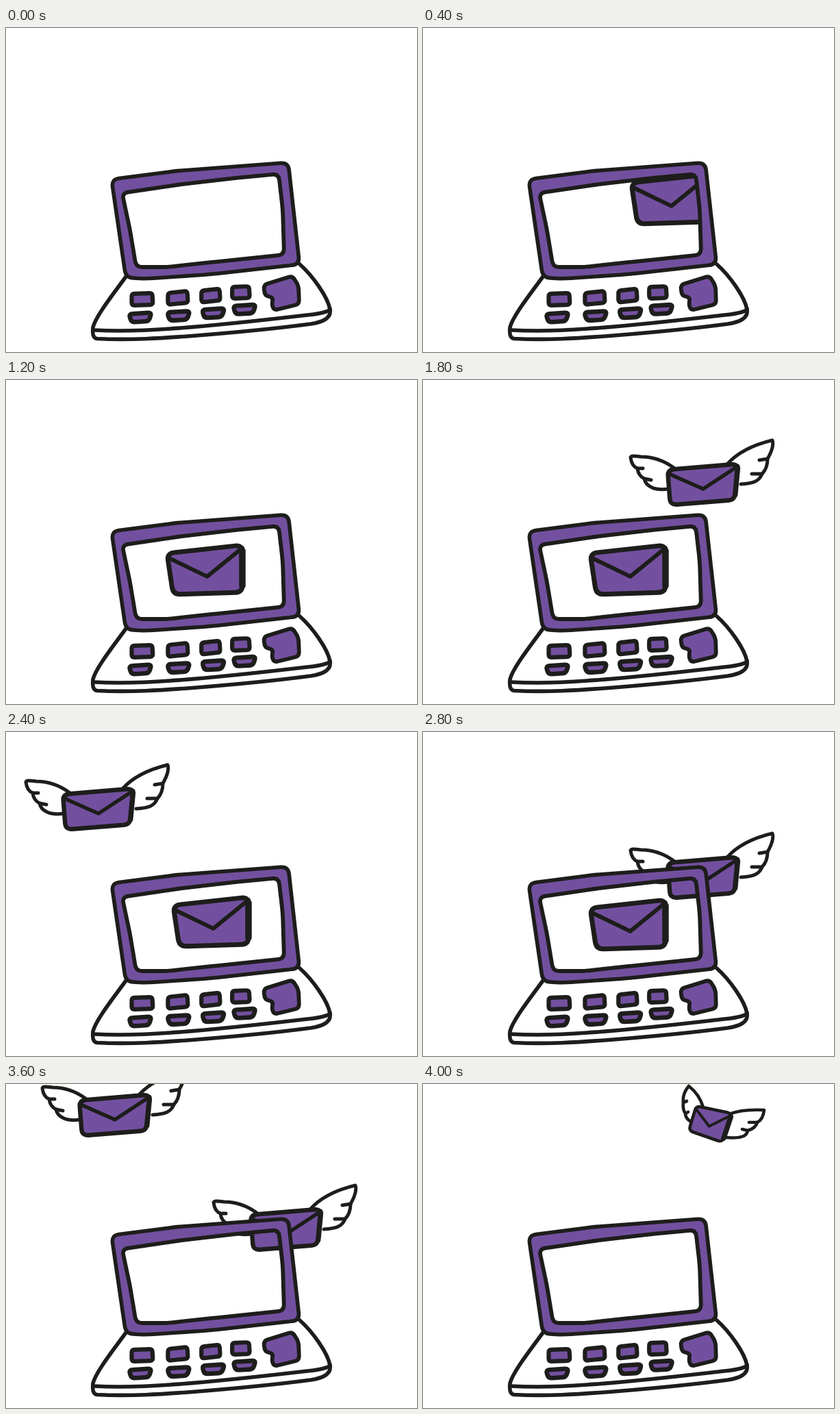
An HTML page for the animation above (4200 ms loop, 600x473 px).

```html
<!DOCTYPE html>
<html lang="en">
<head>
<meta charset="utf-8">
<title>Flying mail</title>
<style>
  html, body { margin: 0; width: 100%; height: 100%; overflow: hidden; background: #fff; }
  svg { display: block; width: 100vw; height: 100vh; }
  path { fill: none; stroke: #1d1d1b; stroke-width: 5.4; stroke-linecap: round; stroke-linejoin: round; }
  .paper { fill: #fff; }
  .tint { fill: #73509f; }
  .area { fill: #73509f; fill-rule: evenodd; stroke: none; }
</style>
</head>
<body>
<svg id="stage" viewBox="0 0 600 473"></svg>
<script>
const STEP = 200, STEPS = 21;
const stage = document.getElementById('stage');

const path = (d, width = 5.4, cls = '') =>
  `<path class="${cls}" d="${d}" style="stroke-width:${width}"/>`;
const mix = (a, b, t) => a.map((v, i) => v + (b[i] - v) * t);

// Closed polygon whose corners are rounded by r
function rounded(pts, r) {
  const n = pts.length;
  const toward = (a, b) => mix(a, b, Math.min(.5, r / Math.hypot(b[0] - a[0], b[1] - a[1])));
  return pts.map((p, i) =>
    `${i ? 'L' : 'M'}${toward(p, pts[(i + n - 1) % n])}Q${p} ${toward(p, pts[(i + 1) % n])}`).join('') + 'Z';
}

// Envelope from its four corners, with a heavier right side
function letter(tl, tr, br, bl, width, heavy) {
  const vee = mix(mix(tl, tr, .52), mix(bl, br, .5), .62);
  const [top, bottom] = [mix(tr, br, .12), mix(tr, br, .86)];
  return path(rounded([tl, tr, br, bl], width * 1.5), width, 'tint') +
    path(`M${mix(tl, bl, .1)}L${vee}L${mix(tr, br, .06)}`, width * .85) +
    path(`M${top}L${bottom}`, heavy);
}

// Two rows of keys, shrinking and climbing to the right
function keys() {
  let out = '';
  for (let c = 0; c < 4; c++) {
    const x = 199 + 54 * c - 2 * c * c, y = 396 - 1.5 * c - .6 * c * c;
    const w = 15.5 - .9 * c, h = 8.5, tilt = c % 3 ? 1.5 : .5;
    out += path(rounded([[x - w, y - h + tilt], [x + w - 1, y - h - tilt],
      [x + w, y + h - tilt], [x - w, y + h + tilt]], 4), 6.2, 'tint');
    const u = 196 + 58.5 * c - 2.6 * c * c, v = 422.5 - 1.5 * c - .8 * c * c;
    out += path(rounded([[u - 16.5, v - 5], [u + 16.5, v - 7],
      [u + 12.5, v + 5.5], [u - 13, v + 7]], 5), 6.6, 'tint');
  }
  return out;
}

const lid = rounded([[154, 221], [250, 208.5], [412, 196.5], [428.5, 345], [300, 359.5], [205, 366], [175, 364.5]], 11);
const screen = rounded([[169.5, 241], [250, 229], [330, 219.5], [398, 213], [404, 265], [406, 331], [300, 342], [235, 349], [190, 349], [181, 295]], 9);

const laptop =
  path('M175 363C160 384 131 420 127 437C126 446 127 453 133 453.5C180 456 225 453 278 449C340 444 400 438 445 432C464 429 475 423 473 411C470 393 448 362 429 345', 5.6, 'paper') +
  path('M128 441C165 443 200 442 240 439C300 435 380 426 440 419C460 417 472 414 473 410', 5.6) +
  path(lid + screen, 0, 'area') + path(lid, 5.6) + path(screen, 5.8) + keys() +
  path(rounded([[376, 375], [418, 362], [427, 376], [428, 403], [392, 412], [388, 405], [390, 393], [378, 391]], 6), 5.8, 'tint');

const wings =
  path('M66 43C52 33 36 27 18 27C10 26 4 25 3 28C4 36 8 42 13 44C14 53 19 57 23 59C25 70 38 77 58 74', 5, 'paper') +
  path('M13 44L21 44M23 59L33 61', 5) +
  path('M144 38C160 20 185 9 210 3C213 12 207 23 203 30C203 40 200 47 195 52C191 63 182 66 164 67', 5, 'paper') +
  path('M203 30L191 32M195 52L180 52', 5);

const tinyWings =
  path('M32 34C28 20 20 10 11 3C5 10 2 18 3 27C2 35 4 40 6 43C6 49 9 52 14 55', 4.6, 'paper') +
  path('M3 27L8 25M6 43L10 41', 4.6) +
  path('M70 44C85 38 102 37 121 38C120 47 117 53 111 56C109 63 104 66 97 68C96 76 86 80 66 78', 4.6, 'paper') +
  path('M111 56L99 56M97 68L89 66', 4.6);

const shapes = {
  mail: letter([4, 15], [114, 3], [114, 72], [13, 75], 7, 9.5),
  fly: wings + letter([57, 46], [160, 37.5], [155, 90], [61, 97.5], 6.4, 7.5),
  far: tinyWings + letter([22, 32], [74, 43], [60, 85], [11, 68], 4.6, 7.5)
};

const defs = Object.keys(shapes).map(id => `<g id="${id}">${shapes[id]}</g>`).join('');
stage.innerHTML = `<defs>${defs}<clipPath id="glass"><path d="${screen}"/></clipPath></defs>
  <g id="air"></g><g id="inside" clip-path="url(#glass)"></g>${laptop}`;
const air = document.getElementById('air');
const inside = document.getElementById('inside');

// Each letter rests on the screen, slides under its rim, then flies three hops
const right = [300, 211], left = [120, 221];
const flights = [
  { at: 1, rest: [240, 246], slide: right, hops: [[271, 145], [300, 85], [300, 11]], end: .916 },
  { at: 6, rest: [231, 238], slide: right, hops: [[271, 145], [300, 85], [300, -8]], end: .88 },
  { at: 9, rest: [240, 238], slide: left, hops: [[30, 145], [26, 45], [33, -22]] },
  { at: 12, rest: [240, 238], slide: right, hops: [[300, 145], [336, 57], [457, 0]], last: 'far' },
  { at: 14, rest: [240, 242], slide: left, hops: [[38, 145], [17, 60], [50, -22]] },
  { at: 16, rest: [240, 246], slide: right, hops: [[300, 145], [322, 57], [377, 0]], last: 'far' }
];

const use = (id, at, scale = 1) =>
  `<use href="#${id}" transform="translate(${at}) scale(${scale})"/>`;

function show(step) {
  let flying = '', resting = '';
  for (const f of flights) {
    const age = step - f.at;
    if (age < 0 || age > 4) continue;
    if (age < 2) resting += use('mail', age ? f.slide : f.rest);
    else if (age < 4) flying += use('fly', f.hops[age - 2]);
    else flying += use(f.last || 'fly', f.hops[2], f.end);
  }
  air.innerHTML = flying;
  inside.innerHTML = resting;
}

let shown = -1;
const start = performance.now();
function render(now) {
  const step = Math.floor(Math.max(0, now - start) / STEP) % STEPS;
  if (step !== shown) show(shown = step);
  requestAnimationFrame(render);
}
render(start);
</script>
</body>
</html>
```
